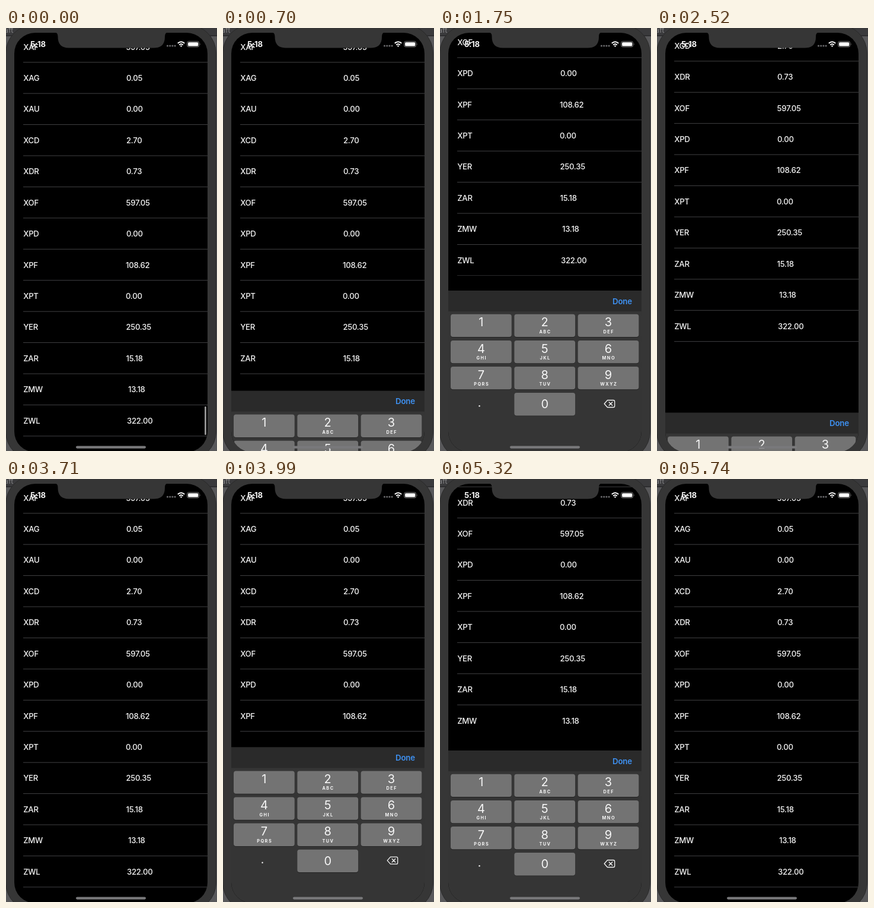
An HTML page for the animation above (6.23 s loop, 356 by 712 pixels).

```html
<!DOCTYPE html>
<html lang="en">
<head>
<meta charset="utf-8">
<title>Rate list with number pad</title>
<style>
  html, body { margin: 0; width: 100%; height: 100%; overflow: hidden; background: #353535; }
  svg { display: block; width: 100vw; height: 100vh; }
  text { font-family: Inter, Roboto, "Liberation Sans", sans-serif; fill: #f6f6f6; }
  .row { font-size: 13.2px; font-weight: 500; letter-spacing: -0.3px; }
  .digit { font-size: 20px; text-anchor: middle; }
  .letters { font-size: 7.3px; font-weight: 700; letter-spacing: 1.5px; text-anchor: middle; }
</style>
</head>
<body>
<svg viewBox="0 0 356 712" preserveAspectRatio="none">
  <defs>
    <clipPath id="screenClip"><rect x="14" y="8" width="326" height="706" rx="35"/></clipPath>
    <clipPath id="listClip"><rect id="listBox" x="14" y="8" width="326" height="681"/></clipPath>
  </defs>

  <!-- window behind the phone -->
  <rect width="356" height="712" fill="#58585a"/>
  <rect width="356" height="13" fill="#3a3a3c"/>
  <rect y="12.5" width="356" height="1.2" fill="#1f1f20"/>
  <text x="-3" y="8" font-size="12.5" style="fill:#858587">aft</text>

  <rect x="-.5" y="-6" width="355" height="734" rx="49" fill="#363636" stroke="#2a2a2a"/>

  <g clip-path="url(#screenClip)">
    <rect x="14" y="8" width="326" height="706" fill="#000"/>
    <g clip-path="url(#listClip)"><g id="list"></g></g>
    <rect id="bar" x="335.2" y="637" width="2.6" height="48" rx="1.3" fill="#a0a0a0"/>
    <g id="pad"></g>
    <rect x="118" y="703.5" width="118" height="4.2" rx="2.1" fill="#79797b"/>
  </g>

  <path d="M82 7 Q87.500 8 87.500 14 V15 Q87.500 33.500 106 33.500 H249.500 Q268 33.500 268 15 V14 Q268 8 273.500 7 Z" fill="#363636"/>

  <!-- status bar -->
  <text x="41" y="31.500" font-size="13.200" font-weight="700" letter-spacing="-.3">5:18</text>
  <g fill="#69696b">
    <circle cx="272.500" cy="30" r="1.600"/><circle cx="276.700" cy="30" r="1.600"/>
    <circle cx="280.900" cy="30" r="1.600"/><circle cx="285.100" cy="30" r="1.600"/>
  </g>
  <g fill="none" stroke="#fff" stroke-width="2">
    <path d="M289.800 25.700 Q295.500 20.700 301.200 25.700"/>
    <path d="M292.200 28.400 Q295.500 25.600 298.800 28.400"/>
  </g>
  <path d="M293.700 30 Q295.500 28.600 297.300 30 L295.500 32 Z" fill="#fff"/>
  <rect x="305.700" y="22.500" width="20" height="9.400" rx="2.800" fill="none" stroke="#8a8a8a" stroke-width=".9"/>
  <rect x="307.100" y="23.900" width="17.200" height="6.600" rx="1.600" fill="#fff"/>
  <path d="M327 25.700 Q328.600 27.200 327 28.700 Z" fill="#8a8a8a"/>
</svg>

<script>
const LOOP = 6230, STEP = 70;
const PITCH = 52.43, PAD_DOWN = 714, PAD_HEIGHT = 272, MAX_SCROLL = 270;
const DRAG_SCROLL = 201.8, DRAG_PAD = 15;

const rows = [
  ['XAF', '597.05', 202.5], ['XAG', '0.05', 203], ['XAU', '0.00', 203],
  ['XCD', '2.70', 203], ['XDR', '0.73', 203], ['XOF', '597.05', 202.5],
  ['XPD', '0.00', 203], ['XPF', '108.62', 202], ['XPT', '0.00', 202],
  ['YER', '250.35', 202.5], ['ZAR', '15.18', 202.5], ['ZMW', '13.18', 206],
  ['ZWL', '322.00', 204]
];
const letters = ['', 'ABC', 'DEF', 'GHI', 'JKL', 'MNO', 'PQRS', 'TUV', 'WXYZ'];

const $ = id => document.getElementById(id);

function add(parent, tag, attrs, content) {
  const el = document.createElementNS('http://www.w3.org/2000/svg', tag);
  for (const key in attrs) el.setAttribute(key, attrs[key]);
  if (content) el.textContent = content;
  parent.appendChild(el);
  return el;
}

function buildList() {
  const list = $('list');
  rows.forEach(([code, rate, x], i) => {
    const y = 36.6 + i * PITCH;
    add(list, 'text', { class: 'row', x: 29.2, y }, code);
    add(list, 'text', { class: 'row', x, y }, rate);
    add(list, 'rect', { x: 29, y: 57.2 + i * PITCH, width: 311, height: 1, fill: '#414143' });
  });
}

function addKey(pad, col, row, digit, sub) {
  const x = 18 + col * 107.3, y = 39.8 + row * 44.1, mid = x + 51.4;
  add(pad, 'rect', { x, y: y + 0.9, width: 102.8, height: 38.3, rx: 4, fill: '#222' });
  add(pad, 'rect', { x, y, width: 102.8, height: 38.3, rx: 4, fill: '#737373' });
  add(pad, 'text', { class: 'digit', x: mid, y: y + (row < 3 ? 20.6 : 26.2) }, digit);
  if (sub) add(pad, 'text', { class: 'letters', x: mid + 0.8, y: y + 32 }, sub);
}

function buildPad() {
  const pad = $('pad');
  add(pad, 'rect', { x: 14, y: 0, width: 326, height: 300, fill: '#353535' });
  add(pad, 'rect', { x: 14, y: 0, width: 326, height: 34.8, fill: '#2a2a2a' });
  add(pad, 'text', {
    x: 291, y: 22.6, 'font-size': 13.3, 'font-weight': 600,
    'letter-spacing': -0.2, style: 'fill:#3e91f2'
  }, 'Done');
  letters.forEach((sub, i) => addKey(pad, i % 3, Math.floor(i / 3), String(i + 1), sub));
  addKey(pad, 1, 3, '0');
  add(pad, 'circle', { cx: 66.5, cy: 194.2, r: 1.2, fill: '#f4f4f4' });
  add(pad, 'path', {
    d: 'M282.500 184.500 H292.500 Q294.700 184.500 294.700 186.700 V194.300 Q294.700 196.500 292.500 196.500 H282.500 L277.200 190.500 Z M285.200 187.700 L290.800 193.300 M290.800 187.700 L285.200 193.300',
    fill: 'none', stroke: '#f4f4f4', 'stroke-width': 1.3,
    'stroke-linejoin': 'round', 'stroke-linecap': 'round'
  });
}

const clamp = v => Math.max(0, Math.min(1, v));
const ramp = (t, start, length) => clamp((t - start) / length);
const ease = u => u * u * (3 - 2 * u);

// Critically damped settling from 0 to 1.
function spring(t, start) {
  const x = Math.max(0, t - start) * 0.0183;
  return 1 - (1 + x) * Math.exp(-x);
}

function padTop(t) {
  const up = PAD_DOWN - PAD_HEIGHT;
  if (t < 2371) return PAD_DOWN - PAD_HEIGHT * spring(t, 628);
  if (t < 3708) return up + PAD_HEIGHT * spring(t, 2371);
  if (t < 5270) return PAD_DOWN - PAD_HEIGHT * spring(t, 3708);
  const pull = DRAG_PAD * ramp(t, 5270, 50);
  return up + pull + (PAD_HEIGHT - pull) * spring(t, 5320);
}

function scrollY(t) {
  if (t < 2388) return MAX_SCROLL * ease(ramp(t, 1235, 300));
  if (t < 4286) return MAX_SCROLL * (1 - ease(ramp(t, 2388, 300)));
  if (t < 5070) return MAX_SCROLL * ease(ramp(t, 4286, 300));
  if (t < 5320) return MAX_SCROLL - (MAX_SCROLL - DRAG_SCROLL) * ramp(t, 5070, 250) ** 2;
  return DRAG_SCROLL * (1 - ramp(t, 5320, 320)) ** 2;
}

function draw(t) {
  const top = padTop(t);
  $('pad').setAttribute('transform', `translate(0 ${top.toFixed(2)})`);
  $('listBox').setAttribute('height', (top - 33).toFixed(2));
  $('list').setAttribute('transform', `translate(0 ${(-scrollY(t)).toFixed(2)})`);
  $('bar').setAttribute('opacity', 1 - ramp(t, 600, 250));
}

function tick() {
  const t = performance.now() % LOOP;
  draw(Math.floor(t / STEP) * STEP);
  requestAnimationFrame(tick);
}

buildList();
buildPad();
tick();
</script>
</body>
</html>
```
